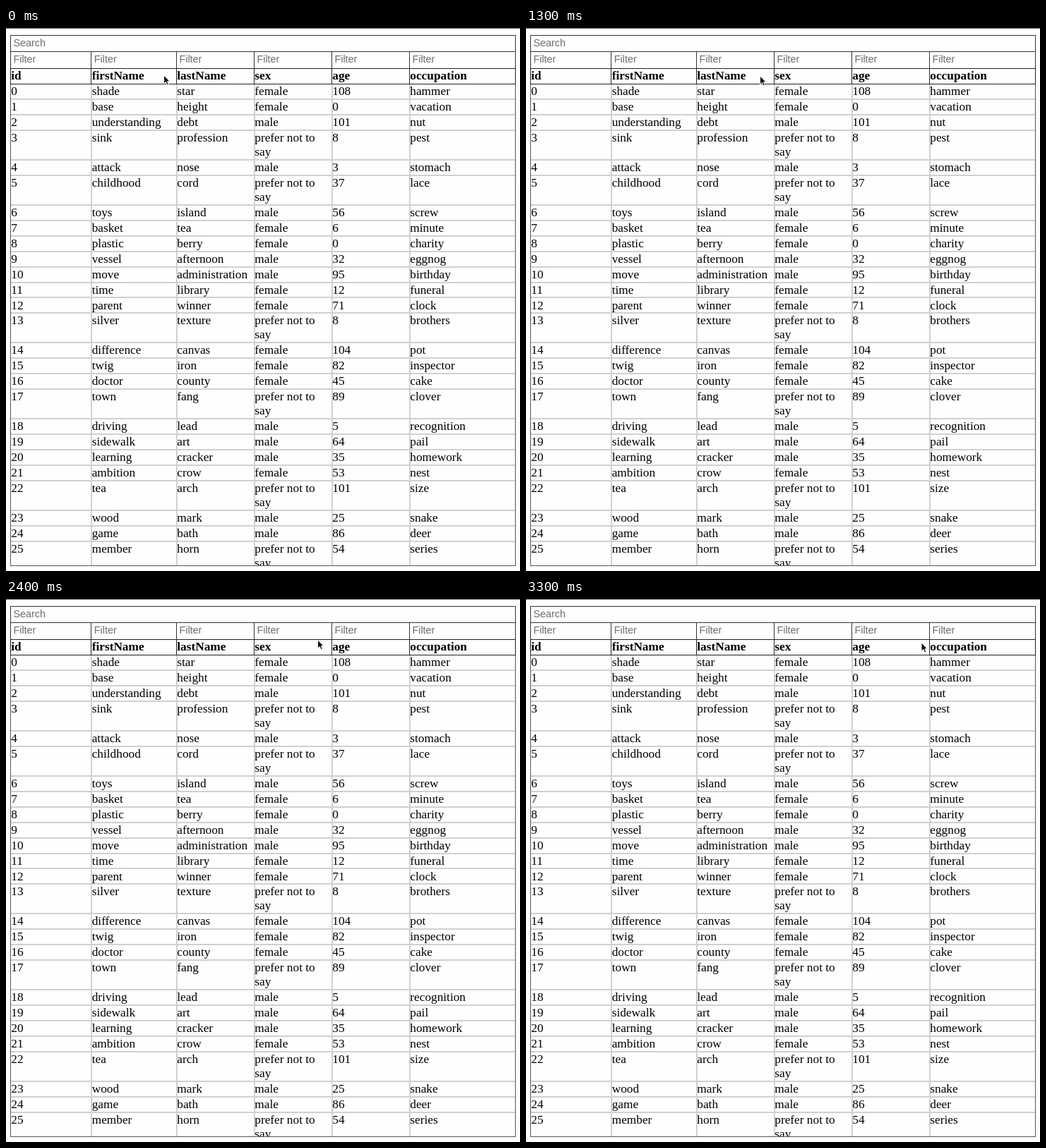
An HTML page that plays this animation: 728 by 770 pixels, repeating every 3400 ms.

```html
<!DOCTYPE html>
<html lang="en">
<head>
<meta charset="utf-8">
<title>Sortable table</title>
<style>
  html, body { margin: 0; width: 100%; height: 100%; overflow: hidden; background: #fefdff; }
  #stage { position: relative; width: 728px; height: 770px; overflow: hidden; color: #000;
    font: 17.3px/20px "Liberation Serif", Times, serif; }
  #stage div, #stage svg { position: absolute; box-sizing: border-box; }
  .edge { left: 0; top: 0; width: 728px; height: 1px; background: #666; }
  .input { border: 1px solid #333; color: #6d6d6d; padding-left: 3.4px;
    font: 14.4px/21px "Liberation Sans", Arial, sans-serif; }
  .th { top: 57px; border: 1px solid #222; font-weight: bold; padding-left: 0.3px; white-space: nowrap; }
  .body { left: 6px; width: 716px; height: 683px; overflow: hidden; border: 1px solid #555; border-top: 0; }
  .view { left: 0; top: 0; width: 714px; height: 683px; }
  .row { left: 0; width: 714px; border-bottom: 2px solid #d0d0d3; }
  .cell { top: 0; white-space: pre; }
  .rule { top: 0; width: 2px; height: 683px; background: #d0d0d3; }
</style>
</head>
<body>
<div id="stage"></div>
<script>
const LOOP = 3400, STEP = 100;
const COLS = ["id", "firstName", "lastName", "sex", "age", "occupation"];
const EDGES = [6, 120.4, 241, 351, 461, 571, 721];
const SEX = { m: "male", f: "female", p: "prefer not to\nsay" };

// Ids of these rows count up from zero.
const FIRST = `shade star f 108 hammer|base height f 0 vacation|understanding debt m 101 nut
sink profession p 8 pest|attack nose m 3 stomach|childhood cord p 37 lace|toys island m 56 screw
basket tea f 6 minute|plastic berry f 0 charity|vessel afternoon m 32 eggnog
move administration m 95 birthday|time library f 12 funeral|parent winner f 71 clock
silver texture p 8 brothers|difference canvas f 104 pot|twig iron f 82 inspector
doctor county f 45 cake|town fang p 89 clover|driving lead m 5 recognition|sidewalk art m 64 pail
learning cracker m 35 homework|ambition crow f 53 nest|tea arch p 101 size|wood mark m 25 snake
game bath m 86 deer|member horn p 54 series`;

const MORE = `109 wrench creature m 74 bear|263 worm apparel p 27 math|203 work fuel m 80 perspective
391 window crowd m 7 point|227 weight ice f 96 oil|189 watch rub p 17 house
152 volleyball cousin m 74 session|329 visitor salt f 50 reaction|174 virus volcano m 19 investment
27 view proposal m 5 vacation|139 veil liquid f 63 examination|338 vehicle love m 80 driver
87 vegetable protest f 39 deer|55 value rule m 14 tree|108 umbrella join m 86 religion
187 two bottle f 75 percentage|123 twist actor m 86 warning|159 twig poison f 55 role
246 truth friends p 76 growth|388 trousers secretary m 30 achieve|120 trees boot p 44 trade
172 treatment cows m 6 camera|83 tray idea m 55 treatment|191 transport fear p 10 slip
118 thrill zephyr m 63 picture|183 communication zebra f 40 accident|298 pie year f 82 harbor
281 degree yam f 55 crow|300 resource yak m 32 whistle|288 children worker f 77 shoes
326 list wood f 73 scarf|94 exchange wood f 13 development|229 disease women m 43 representative
289 chess wire p 2 volume|51 coast winner f 25 face|399 basis weight f 106 line
190 reflection weight p 9 moon|262 berry wax m 52 platform|61 stem wax f 81 birthday
284 funeral waves m 24 community|374 significance water m 69 son|141 existence watch m 41 plastic
301 smell wall m 27 rainstorm|330 plough walk f 67 tray|116 advice volume p 78 star
145 toys voice m 24 friction|150 entry visitor p 79 concept|119 spark view f 85 zoo
113 leader vein p 12 berry|53 topic afternoon f 0 entry|185 tax point p 0 parent
240 dirt definition m 0 cannon|72 breath lettuce f 1 poem|128 design moon p 1 plantation
261 cabinet emphasis f 1 power|232 nail two p 2 religion|241 ticket eggs f 2 emphasis
251 perspective policy p 2 mitten|307 station dust p 3 fuel|157 shoe pies f 4 children
181 skin leather m 4 test|213 copper club f 4 thing|285 combination frogs m 4 assistant
376 reality look p 4 fog|57 bath silver p 5 pig|161 song friend m 5 collection|175 dad toe m 5 kitten`;

const split = text => text.split(/[|\n]/).map(line => line.split(" "));
const people = [...split(FIRST).map((r, i) => [String(i), ...r]), ...split(MORE)]
  .sort((a, b) => a[0] - b[0]);

// [start, sorted column, direction]; column 0 means the plain order.
const SORTS = [
  [0, 0, 1], [200, 1, 1], [400, 1, -1], [700, 0, 1],
  [1500, 2, 1], [1700, 2, -1], [2000, 0, 1],
  [2800, 4, 1], [3000, 4, -1], [3300, 0, 1]
];
// [time, x, y] of the pointer tip
const PATH = [
  [0, 223.5, 67], [900, 223.5, 67], [1300, 331.5, 68], [2100, 331.5, 68],
  [2400, 441.5, 58], [2700, 560, 62], [LOOP, 560, 62]
];

const stage = document.getElementById("stage");

function box(parent, cls, style = {}, text = "") {
  const el = document.createElement("div");
  el.className = cls;
  el.textContent = text;
  for (const k in style) el.style[k] = style[k] + "px";
  parent.append(el);
  return el;
}

function svg(w, h, shapes) {
  const holder = document.createElement("template");
  holder.innerHTML = `<svg width="${w}" height="${h}" viewBox="0 0 ${w} ${h}" style="left:0;top:0">${shapes}</svg>`;
  return stage.appendChild(holder.content.firstChild);
}

function sorted(col, dir) {
  const rows = people.slice();
  if (col) {
    rows.sort((a, b) => col === 4 ? a[4] - b[4] : a[col] < b[col] ? -1 : a[col] > b[col] ? 1 : 0);
  }
  return dir < 0 ? rows.reverse() : rows;
}

function makeView(col, dir) {
  const view = box(body, "view");
  let top = 0;
  for (const r of sorted(col, dir)) {
    if (top > 683) break;
    const height = r[3] === "p" ? 42 : 21.95;
    const row = box(view, "row", { top, height });
    r.forEach((v, i) => box(row, "cell", { left: EDGES[i] - 5.7 }, i === 3 ? SEX[v] : v));
    top += height;
  }
  return view;
}

box(stage, "edge");
box(stage, "input", { left: 6, top: 10, width: 716, height: 24 }, "Search");
const heads = COLS.map((name, i) => {
  const left = EDGES[i], width = EDGES[i + 1] - left + 1;
  box(stage, "input", { left, top: 33, width, height: 25 }, "Filter");
  return box(stage, "th", { left, width }, name);
});

const body = box(stage, "body");
EDGES.slice(1, -1).forEach(x => box(body, "rule", { left: x - 7 }));
const views = {};
for (const [, col, dir] of SORTS) views[col * dir] ??= makeView(col, dir);

const icon = svg(19, 19, `
  <rect x=".5" y=".5" width="18" height="18" rx="3" fill="#6f9cc4"/>
  <rect x="1.5" y="1.5" width="16" height="16" rx="2.2" fill="#4f83b3"/>
  <path d="M9.5 4.2 15 13.6H4Z" fill="#fff" stroke="#fff" stroke-linejoin="round"/>`);
const ICON_X = { 1: 199.5, 2: 316, 4: 492 };

const arrow = svg(12, 18, `
  <path d="M1 1V13L3.8 10.5 5.7 14.8 7.9 13.9 6 9.7H9.6Z" fill="#111" stroke="#fff"/>`);
const BEAM = "M1.5 1.5Q4 1.5 4 4Q4 1.5 6.5 1.5M4 4V13M1.5 15.5Q4 15.5 4 13Q4 15.5 6.5 15.5";
const beam = svg(8, 17, `
  <path d="${BEAM}" fill="none" stroke="#fff" stroke-width="2.6"/>
  <path d="${BEAM}" fill="none" stroke="#333"/>`);

function pointerAt(t) {
  const i = Math.max(1, PATH.findIndex(p => p[0] >= t));
  const [t0, x0, y0] = PATH[i - 1], [t1, x1, y1] = PATH[i];
  const k = (t - t0) / (t1 - t0);
  return [x0 + (x1 - x0) * k, y0 + (y1 - y0) * k];
}

const show = (el, on) => el.style.display = on ? "block" : "none";
const move = (el, x, y) => el.style.transform = `translate(${x}px, ${y}px)`;

function draw(t) {
  const [, col, dir] = SORTS.filter(s => s[0] <= t).pop();
  heads.forEach((h, i) => {
    h.style.height = (col ? 28 : 23) + "px";
    h.style.paddingTop = col && i === col ? "4px" : "0";
  });
  body.style.top = (col ? 85.5 : 80) + "px";
  for (const key in views) show(views[key], +key === col * dir);

  show(icon, col);
  if (col) icon.style.transform = `translate(${ICON_X[col]}px, 61px) scaleY(${-dir})`;

  // Over the icon the arrow becomes a text cursor.
  const [x, y] = pointerAt(t);
  const overIcon = col && x > ICON_X[col] && x < ICON_X[col] + 19;
  show(arrow, !overIcon);
  show(beam, overIcon);
  move(arrow, x - 1, y - 1);
  move(beam, x - 4, y - 6);
}

const start = performance.now();
let last = -1;
function tick() {
  const t = Math.floor((performance.now() - start) % LOOP / STEP) * STEP;
  if (t !== last) draw(last = t);
  requestAnimationFrame(tick);
}
tick();
</script>
</body>
</html>
```
